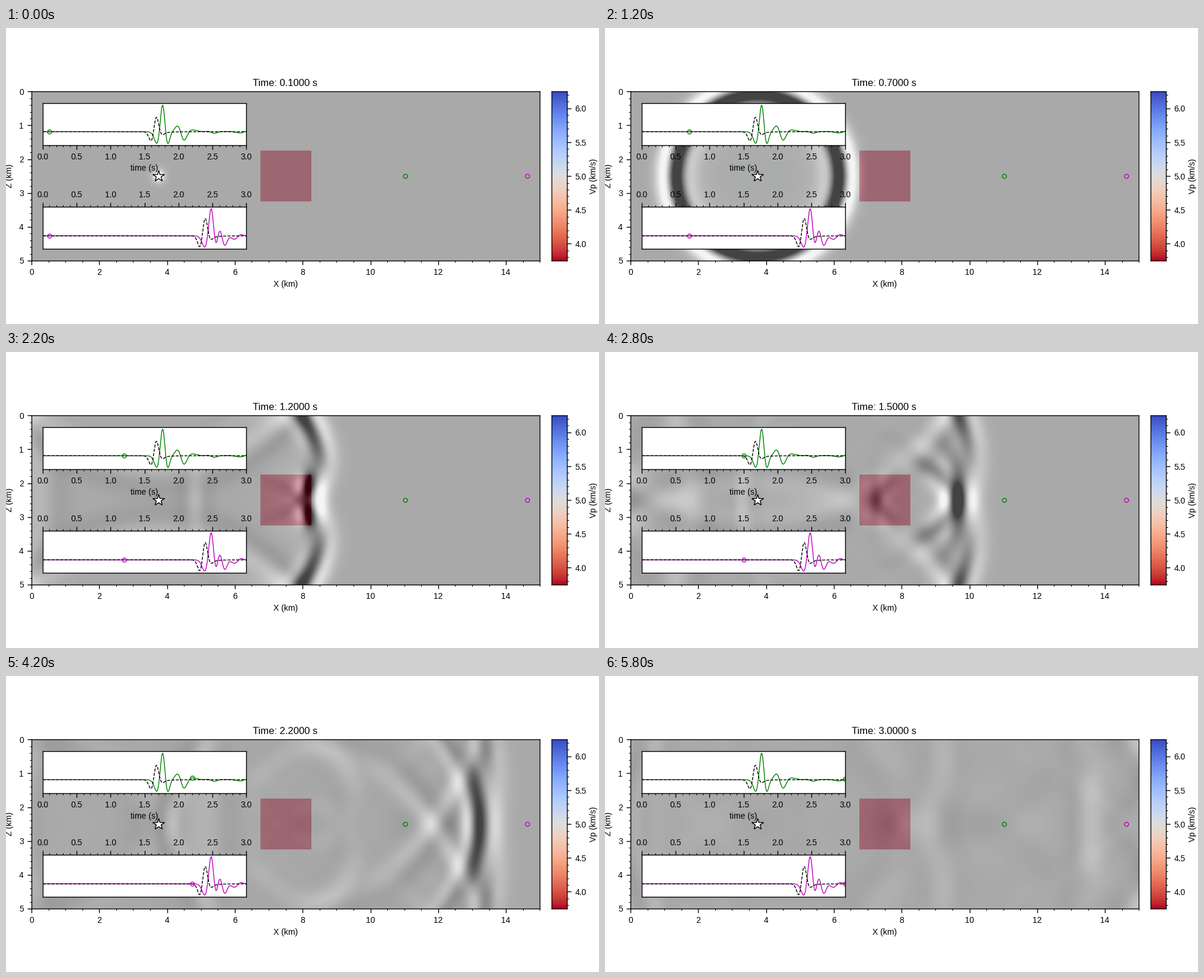
Recreate the animation shown at these times as a matplotlib script. Size 1000 px wide and 500 px high, loop 6 s.

```python
import numpy as np
import matplotlib.pyplot as plt
from matplotlib.animation import FuncAnimation
from matplotlib.patches import Rectangle
from matplotlib.ticker import AutoMinorLocator, MultipleLocator

W, H, DPI = 1000, 500, 100
plt.rcParams.update({
    "font.family": "Liberation Sans", "font.size": 10,
    "axes.linewidth": 1.0,
    "xtick.major.size": 5, "ytick.major.size": 5,
    "xtick.minor.size": 2.5, "ytick.minor.size": 2.5,
    "xtick.major.width": 1.0, "ytick.major.width": 1.0,
    "xtick.minor.width": 0.8, "ytick.minor.width": 0.8,
    "xtick.major.pad": 4.5, "ytick.major.pad": 4.5,
})

# model, in km and s
LX, LZ, STEP, PAD = 15.0, 5.0, 0.025, 1.0
DT, FRAMES, PER = 0.0025, 30, 40
VP, VP_SLOW = 5.0, 3.75
SRC, REC = (3.75, 2.5), ((11.03, 2.5), (14.62, 2.5))
BLOCK = (6.75, 1.75, 1.5, 1.5)
FREQ, DELAY = 5.0, 0.2


def ricker(t):
    a = (np.pi * FREQ * (t - DELAY)) ** 2
    return (1 - 2 * a) * np.exp(-a)


def direct(dist, times):
    """Exact 2D response of the uniform medium."""
    t0 = dist / VP
    q = np.linspace(0, np.arccosh(3.1 / t0), 2500)
    lag = times[:, None] - t0 * np.cosh(q)[None, :]
    s = np.where(lag > 0, ricker(lag), 0)
    return s.sum(1) * (q[1] - q[0]) / (2 * np.pi * VP ** 2)


def edge(pos, length):
    d = np.clip(np.maximum(-pos, pos - length) / PAD, 0, 1)
    return d - np.sin(2 * np.pi * d) / (2 * np.pi)


def simulate():
    n = round(PAD / STEP)
    nx, nz = round(LX / STEP) + 1, round(LZ / STEP) + 1
    x = (np.arange(nx + 2 * n) - n) * STEP
    z = (np.arange(nz + 2 * n) - n) * STEP
    bx, bz, bw, bh = BLOCK
    slow = ((z >= bz) & (z <= bz + bh))[:, None] & ((x >= bx) & (x <= bx + bw))
    vel = np.where(slow, VP_SLOW, VP)
    damp = 80 * np.maximum(edge(z, LZ)[:, None], edge(x, LX)[None, :]) * DT / 2
    f32 = np.float32
    cur_w = (2 / (1 + damp)).astype(f32)
    old_w = ((1 - damp) / (1 + damp)).astype(f32)
    lap_w = ((vel * DT / STEP) ** 2 / (1 + damp)).astype(f32)[1:-1, 1:-1]

    def node(p):
        return round(p[1] / STEP) + n, round(p[0] / STEP) + n

    src, rec = node(SRC), [node(r) for r in REC]
    u, old = np.zeros(vel.shape, f32), np.zeros(vel.shape, f32)
    lap = np.zeros(lap_w.shape, f32)
    snaps, traces = [], [[0.0] for _ in REC]
    for k in range(FRAMES * PER):
        np.add(u[2:, 1:-1], u[:-2, 1:-1], out=lap)
        lap += u[1:-1, 2:]
        lap += u[1:-1, :-2]
        lap -= 4 * u[1:-1, 1:-1]
        lap *= lap_w
        old *= -old_w
        old += cur_w * u
        old[1:-1, 1:-1] += lap
        old[src] += DT ** 2 * ricker(k * DT) / STEP ** 2
        u, old = old, u
        for tr, p in zip(traces, rec):
            tr.append(float(u[p]))
        if (k + 1) % PER == 0:
            snaps.append(u[n:n + nz, n:n + nx].copy())
    return snaps, np.array(traces)


snaps, traces = simulate()
times = np.arange(FRAMES * PER + 1) * DT
plain = [direct(r[0] - SRC[0], times) for r in REC]
gain = 0.45 / plain[0].max()

fig = plt.figure(figsize=(W / DPI, H / DPI), dpi=DPI, facecolor="white")


def add_axes(x0, y0, x1, y1):
    return fig.add_axes([x0 / W, 1 - y1 / H, (x1 - x0) / W, (y1 - y0) / H])


def label(x, y, text, **kw):
    return fig.text(x / W, 1 - y / H, text, ha="center", va="center", **kw)


vp_map = plt.get_cmap("coolwarm_r")
ax = add_axes(43, 107.3, 900.3, 393)
ax.set_facecolor(vp_map(0.5))
ax.add_patch(Rectangle(BLOCK[:2], *BLOCK[2:], fc=vp_map(0.0), lw=0, zorder=0.5))
half = STEP / 2
field = ax.imshow(snaps[0], cmap="gray", vmin=0, vmax=1, alpha=0.7, aspect="auto",
                  extent=(-half, LX + half, LZ + half, -half), zorder=1)
ax.set(xlim=(0, LX), ylim=(LZ, 0))
ax.xaxis.set_major_locator(MultipleLocator(2))
ax.yaxis.set_major_locator(MultipleLocator(1))
ax.xaxis.set_minor_locator(AutoMinorLocator())
ax.yaxis.set_minor_locator(AutoMinorLocator())
ax.plot(*SRC, "*", ms=15, mfc="white", mec="black", mew=1)
for r, color in zip(REC, "gm"):
    ax.plot(*r, "o", ms=5, mfc="none", mec=color, mew=1)

title = label(471, 93.5, "", fontsize=12)
label(471.5, 432.5, "X (km)")
label(6, 250, "Z (km)", rotation=90)
label(991, 250.5, "Vp (km/s)", rotation=90)
label(233.5, 237.5, "time (s)", zorder=10)

bar = add_axes(920, 107.3, 946, 393)
bar.imshow(np.linspace(0, 1, 256)[:, None], cmap=vp_map, origin="lower",
           aspect="auto", extent=(0, 1, 3.75, 6.25))
bar.yaxis.tick_right()
bar.yaxis.set_major_locator(MultipleLocator(0.5))
bar.yaxis.set_minor_locator(AutoMinorLocator())
bar.set_xticks([])

dots = []
for i, (top, color) in enumerate(((127.3, "g"), (302.3, "m"))):
    box = add_axes(62, top, 405.3, top + 71)
    box.plot(times, traces[i], color=color, lw=1)
    box.plot(times, plain[i], "k--", lw=1)
    dots += box.plot([0], [0], "o", ms=5, mfc="none", mec=color, mew=1)
    box.set_xlim(0, 3)
    box.set_yticks([])
    box.xaxis.set_major_locator(MultipleLocator(0.5))
    box.xaxis.set_minor_locator(AutoMinorLocator())
    if i == 1:
        box.xaxis.tick_top()


def draw(i):
    k = (i + 1) * PER
    field.set_data(np.clip(0.58 - gain * snaps[i], 0, 1))
    title.set_text(f"Time: {times[k]:.4f} s")
    for dot, tr in zip(dots, traces):
        dot.set_data([times[k]], [tr[k]])
    return [field, title, *dots]


anim = FuncAnimation(fig, draw, frames=FRAMES, interval=200,
                     init_func=lambda: draw(0), repeat=True, repeat_delay=0)
plt.show()
```
